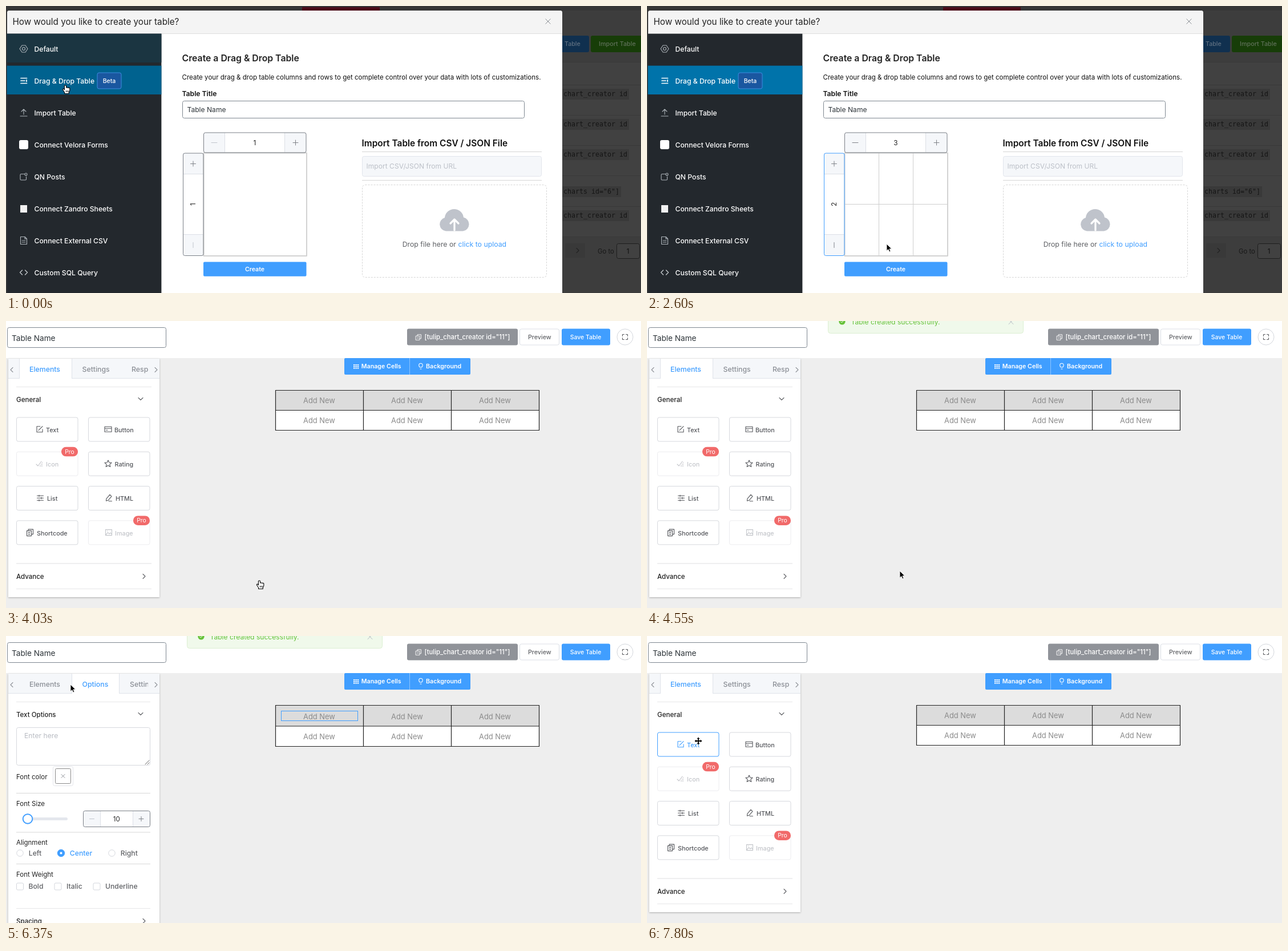
Animation of 1113 by 503 pixels, one loop 8000 ms. Source, as an HTML page:

```html
<!DOCTYPE html>
<html lang="en">
<head>
<meta charset="utf-8">
<title>Table builder</title>
<style>
  html, body { margin: 0; width: 100%; height: 100%; overflow: hidden; background: #eee; }
  svg { display: block; width: 100vw; height: 100vh; font-family: Inter, "Open Sans", sans-serif; }
  text { white-space: pre; }
  .m { font-weight: 500; }
  .b { font-weight: 600; }
  .mid { text-anchor: middle; }
  .code { font-family: "DejaVu Sans Mono", monospace; }
  .line { fill: none; stroke: currentColor; stroke-linecap: round; stroke-linejoin: round; }
  .frame { fill: none; stroke: #7b8087; }
  .colHot #colFrame, .rowHot #rowFrame { stroke: #409eff; }
  .colHot #colPlus, .rowPlus #rowPlus { color: #48aaa8; }
  .active { fill: #0073aa; }
  .leaving .active { fill: #00628f; }
  .createHot #create { fill: #66b1ff; }
  .tabHot #tabElements { fill: #409eff; }
  .cardHot #card0 { color: #409eff; }
  .cardHot #card0 rect { stroke: #409eff; }
</style>
</head>
<body>
<svg id="stage" viewBox="0 0 1113 503" preserveAspectRatio="none"></svg>
<script>
const LOOP = 8000, BLUE = '#409eff', GREY = '#606266', SIGN = '#7f8288', FAINT = '#c0c4cc', MUTED = '#aeb4ba';
const stage = document.getElementById('stage');

const text = (x, y, s, size, fill = '#222', cls = '', more = '') =>
  `<text x="${x}" y="${y}" font-size="${size}" fill="${fill}" class="${cls}" ${more}>${s}</text>`;
const rect = (x, y, w, h, fill, more = '') =>
  `<rect x="${x}" y="${y}" width="${w}" height="${h}" fill="${fill}" ${more}/>`;
const box = (x, y, w, h, fill, stroke, r = 3, more = '') =>
  rect(x + .5, y + .5, w - 1, h - 1, fill, `stroke="${stroke}" rx="${r}" ${more}`);
const line = (d, color, width = 1, more = '') =>
  `<path class="line" d="${d}" color="${color}" stroke-width="${width}" ${more}/>`;
const rule = (x1, x2, y, color) => rect(x1, y, x2 - x1, 1, color);
const icon = (x, y, d, color = 'inherit', width = 1.1) =>
  `<g transform="translate(${x} ${y})">${line(d, color, width)}</g>`;
const group = (body, more = '') => `<g ${more}>${body}</g>`;
const plus = (x, y, r, color, more = '') =>
  line(`M${x - r} ${y}h${2 * r}M${x} ${y - r}v${2 * r}`, color, 1, more);
const cross = (x, y, r, color) =>
  line(`M${x - r} ${y - r}l${2 * r} ${2 * r}m0 ${-2 * r}l${-2 * r} ${2 * r}`, color);
const chevron = { down: 'M-4-2L0 2L4-2', right: 'M-2-4L2 0L-2 4', left: 'M2-4L-2 0L2 4' };

function backdrop() {
  const codeRows = [[154, 'chart_creator id'], [207, 'chart_creator id'], [260, 'chart_creator id'],
    [325, 'charts id="6"]'], [367, 'chart_creator id']];
  return rect(0, 0, 1113, 503, '#3d3d3d') + rect(0, 0, 1113, 8, '#373737') +
    rect(519, 2, 136, 6, '#4a0a17') + rect(975, 98, 138, 306, '#414141') +
    [98, 138, 191, 244, 297, 351, 404].map(y => rule(975, 1113, y, '#393939')).join('') +
    rect(960, 52, 62, 29, '#10304f', 'rx="3"') + text(979, 70, 'Table', 10.7, '#5f7081', 'm') +
    rect(1025, 52, 92, 29, '#173d08', 'rx="3"') + text(1039, 70, 'Import Table', 10.8, '#5f7059', 'm') +
    codeRows.map(([y, s]) => rect(970, y - 9, s.length * 7 + 10, 19, '#393939') +
      text(977, y + 4, s, 11.63, '#151515', 'code')).join('') +
    rect(980, 416, 35, 25, '#393939') + icon(1002, 428.5, chevron.right, '#222') +
    text(1037, 434, 'Go to', 11.3, '#181818') + box(1070, 416, 41, 27, '#414141', '#1e1e1e') +
    text(1090, 434, '1', 11.5, '#0e0e0e', 'mid');
}

function sidebar() {
  const labels = ['Default', 'Drag &amp; Drop Table', 'Import Table', 'Connect Velora Forms',
    'QN Posts', 'Connect Zandro Sheets', 'Connect External CSV', 'Custom SQL Query'];
  const hexagon = 'M-3-6H3L7 0L3 6H-3L-7 0ZM2.5 0A2.5 2.5 0 1 1-2.5 0A2.5 2.5 0 1 1 2.5 0';
  const icons = [
    icon(31, 75, hexagon, MUTED),
    icon(31, 131, 'M-5-4.5H5.5M-5 0H2M-5 4.5H5.5M5-1.5v3', '#fff', 1.7),
    icon(31, 187, 'M0 3V-5.5M-4-2L0-6L4-2M-6 6H6', MUTED),
    rect(23, 235, 16, 16, '#fff', 'rx="3"'),
    icon(31, 299, 'M1-4.5H-4.5Q-6-4.5-6-3V4.5Q-6 6-4.5 6H3Q4.5 6 4.5 4.5V0M6-4A2 2 0 1 1 2-4A2 2 0 1 1 6-4', MUTED),
    rect(25, 349, 12, 13, '#f2f2f2'),
    icon(31, 411, 'M-5.5-6.5H2L5.5-3V6.5H-5.5ZM2-6V-3H5M-3 0H3M-3 3H3', MUTED),
    icon(31, 467, 'M-2.5-4L-6.5 0L-2.5 4M2.5-4L6.5 0L2.5 4', '#c3c8cc', 1.4)
  ];
  return rect(1.6, 48.6, 270.8, 455, '#23282d') +
    rect(1.6, 48.6, 270.8, 50.4, '#1b3541', 'data-on="leaving"') +
    rect(1.6, 104.6, 270.8, 50.4, '#0073aa', 'class="active"') +
    labels.map((s, i) => text(49.5, 79.5 + 56 * i, s, 12.2, '#fff', 'm')).join('') + icons.join('') +
    box(159.5, 116.5, 43, 29, '#1a57a0', '#3f8ce0') + text(181, 135.3, 'Beta', 10.5, '#fff', 'm mid');
}

function counters() {
  return rect(347, 222, 179, 35, '#fff') + rect(347, 222, 36, 35, '#f5f7fa') + rect(489, 222, 37, 35, '#f5f7fa') +
    rect(383, 222, 1, 35, '#dcdfe6') + rect(488, 222, 1, 35, '#dcdfe6') +
    line('M360 239.5h10', FAINT, 1, 'id="colMinus"') + plus(507.5, 239.5, 4.5, SIGN, 'id="colPlus"') +
    text(436, 244, '1', 11.8, '#222', 'mid', 'id="colCount"') +
    rect(310, 258, 36, 36, '#f5f7fa') + rect(310, 401, 36, 36, '#f5f7fa') +
    rule(310, 346, 294, '#dcdfe6') + rule(310, 346, 400, '#dcdfe6') +
    line('M328 414.5v9', FAINT, 1, 'id="rowMinus"') + plus(328, 276.5, 4.5, SIGN, 'id="rowPlus"') +
    text(0, 4.3, '1', 11.8, '#222', 'mid', 'id="rowCount" transform="translate(328 347.5) rotate(-90)"') +
    line('M346.5 257.5H527V438H346.5Z', '#d2d2d2', 2) + line('', '#cfcfcf', 1, 'id="grid"') +
    rect(346.5, 222, 179.5, 35, 'none', 'id="colFrame" class="frame" rx="3"') +
    rect(310.5, 258, 35.5, 179.5, 'none', 'id="rowFrame" class="frame" rx="3"');
}

function modal() {
  const cloud = 'M771 394.5A12 12 0 0 1 769 371A16.6 16.6 0 0 1 802 370.5A12.2 12.2 0 0 1 801 394.5Z';
  return backdrop() + rect(2, 8, 973, 500, '#fff', 'rx="4"') +
    '<path d="M2 49V12Q2 8 6 8H971Q975 8 975 12V49Z" fill="#f4f4f4"/>' + rule(2, 975, 48, '#dedede') +
    text(11.5, 33.3, 'How would you like to create your table?', 15.25, '#222') + cross(950, 27, 4.2, '#8b8f95') +
    sidebar() +
    text(308.5, 96.7, 'Create a Drag &amp; Drop Table', 15.8, '#222', 'b') +
    text(308.5, 129, 'Create your drag &amp; drop table columns and rows to get complete control over your data with lots of customizations.', 11.57, '#111') +
    text(308.5, 157.7, 'Table Title', 12.15, '#111', 'b') +
    box(309, 166, 600, 31, '#fff', '#7e8790') + text(317.5, 186, 'Table Name', 12.1, '#2c3338') +
    counters() +
    rect(346, 448.5, 180.5, 25.2, BLUE, 'rx="2" id="create"') + text(436, 465.3, 'Create', 10.6, '#fff', 'b mid') +
    text(623.5, 245.5, 'Import Table from CSV / JSON File', 15.45, '#111', 'b') +
    rule(624, 939, 255, '#d5d5d5') + box(624, 263, 315, 36, '#f5f7fa', '#e2e5ec') +
    text(631.5, 285.3, 'Import CSV/JSON from URL', 12.1, '#bcc0c8') + rule(624, 939, 305, '#d5d5d5') +
    box(624, 313, 324, 163, '#fff', '#d6d6d6', 5, 'stroke-dasharray="3 2"') +
    `<path d="${cloud}" fill="#bfc3cb"/>` + line('M786 393V375M779 381L786 374L793 381', '#fff', 3.2) +
    text(694.7, 422.3, `Drop file here or <tspan fill="${BLUE}">click to upload</tspan>`, 12.3, GREY);
}

function tabs(names, active) {
  const narrow = names[1] === 'Options';
  const edges = [23, 115, narrow ? 198 : 201, 258];
  const labelX = [41, 133.5, narrow ? 217 : 220];
  return rect(4, 66, 265, 35, '#f5f7fa') + rule(4, 269, 100, '#dfe3ea') +
    rect(edges[active], 66, edges[active + 1] - edges[active], 35, '#fff') +
    [edges[active], edges[active + 1]].map(x => rect(x, 66, 1, 35, '#dfe3ea')).join('') +
    names.map((s, i) => text(labelX[i], 88.5, s, 12.3, i === active ? BLUE : '#8b8f96', 'm',
      `clip-path="url(#tabClip)" ${i === 0 && active ? 'id="tabElements"' : ''}`)).join('') +
    icon(10, 85.5, chevron.left, '#909399') + icon(263, 85.5, chevron.right, '#909399');
}

function elementsPanel() {
  const cards = [
    ['Text', 70, 59, 'M1-5H-5V5H5V0M-1.5 1.5L5-5M-1.5 1.5L-2 2'],
    ['Button', 190, 179, 'M-6-4.5H6V4.5H-6ZM-6-1.5H6M-3.5 1.5H-1'],
    ['Icon', 70, 59, 'M-6 1L-3 4L3-4M0 4H5M2 1H5M4-2H5'],
    ['Rating', 190.5, 179, 'M0-6L1.8-2L6-1.6L2.8 1.3L3.8 5.5L0 3.2L-3.8 5.5L-2.8 1.3L-6-1.6L-1.8-2Z'],
    ['List', 72, 60, 'M-5.5-4H5.5M-5.5 0H5.5M-5.5 4H5.5M-2-5.3v2.6M2-1.3v2.6M-2 2.7v2.6'],
    ['HTML', 192, 180, 'M-4.5 5L-4 1L2-6L5-3L-1 4ZM0 5.5H5.5'],
    ['Shortcode', 54, 42, 'M-5.5-3H2.5V6H-5.5ZM-3-3V-5.5H5.5V3H2.5M-3 0H0M-3 3H0'],
    ['Image', 191, 180, 'M-5.5-5H5.5V5H-5.5ZM-5 4L-1.5 0L1 2.5L3 .5L5.5 3M-2.5-2.5h.4']
  ];
  const card = ([label, x, iconX, d], i) => {
    const left = i % 2 ? 144 : 18, top = 168.5 + 60.3 * (i >> 1), pro = i === 2 || i === 7;
    return group(box(left, top, 108.5, 43, '#fff', pro ? '#ececef' : '#d6d8dd') +
      icon(iconX, top + 21.2, d) + text(x, top + 26.2, label, 10.8, 'currentColor', 'm') +
      (pro ? rect(left + 79, top - 8, 29, 16.5, '#f16a6a', 'rx="8"') +
        text(left + 93.5, top + 4, 'Pro', 10.4, '#fff', 'mid') : ''),
      `id="card${i}" color="${pro ? '#c3c5ca' : '#55575c'}"`);
  };
  return rect(4, 66, 265, 418, '#fff', 'filter="url(#shadow)"') + tabs(['Elements', 'Settings', 'Resp'], 0) +
    rule(18, 255, 115, '#e6e6e8') + text(18, 141.7, 'General', 11.6, '#222', 'm') + icon(236, 136.5, chevron.down, GREY) +
    cards.map(card).join('') + rule(18, 255, 424.5, '#dfdfe2') +
    text(18, 452, 'Advance', 11.5, '#222', 'm') + icon(242, 447.5, chevron.right, GREY) + rule(18, 255, 469, '#e6e6e8');
}

function optionsPanel() {
  const radio = (x, label, on) =>
    `<circle cx="${x}" cy="380.5" r="${on ? 6.2 : 5.7}" fill="${on ? BLUE : '#fff'}" stroke="${on ? BLUE : '#d4d7dd'}"/>` +
    (on ? `<circle cx="${x}" cy="380.5" r="2" fill="#fff"/>` : '') +
    text(x + 15.3, 385, label, 12.2, on ? BLUE : GREY, 'm');
  const check = (x, label) => box(x, 432.5, 13, 13, '#fff', '#d4d7dd', 2) + text(x + 21.5, 443.3, label, 12.2, GREY, 'm');
  return rect(4, 66, 265, 445, '#fff', 'filter="url(#shadow)"') + tabs(['Elements', 'Options', 'Settings'], 1) +
    rule(18, 253, 115, '#e6e6e8') + text(18, 141.7, 'Text Options', 11.5, '#222', 'm') + icon(236, 136.5, chevron.down, GREY) +
    box(18, 160, 235, 67, '#fff', '#d6d8dd') + text(32, 179, 'Enter here', 12.2, '#b9bcc3') +
    line('M244 225L251 218M248 225L251 222', '#666') +
    text(18, 251.3, 'Font color', 11.5) + box(82, 228, 36, 35, '#fff', '#e3e5ea') +
    box(86, 232, 28, 27, '#fff', '#8a8a8a', 2) + cross(100, 245.5, 3, '#909399') +
    rule(18, 253, 275, '#d8d8d8') + text(18, 297.5, 'Font Size', 11.5) +
    rect(38, 318, 70, 5, '#e4e7ed', 'rx="2.5"') + `<circle cx="38" cy="320.5" r="8.3" fill="#fff" stroke="${BLUE}" stroke-width="2"/>` +
    box(135, 306, 118, 29, '#f5f7fa', '#7b8087') + rect(165, 307, 58, 27, '#fff') +
    rect(165, 307, 1, 27, '#dcdfe6') + rect(222, 307, 1, 27, '#dcdfe6') +
    line('M146.5 320.5h8', FAINT) + plus(237, 320.5, 4, SIGN) + text(193.7, 325, '10', 11.5, '#222', 'mid') +
    rule(18, 253, 343.5, '#d8d8d8') + text(18, 366, 'Alignment', 11.5) +
    radio(24.5, 'Left') + radio(96.5, 'Center', true) + radio(185.5, 'Right') +
    rule(18, 253, 399, '#d8d8d8') + text(18, 421.7, 'Font Weight', 11.5) +
    check(18, 'Bold') + check(84.5, 'Italic') + check(152.5, 'Underline') +
    rule(18, 253, 477, '#e6e6e8') + text(18, 504, 'Spacing', 11.5, '#222', 'm') + icon(242, 499.5, chevron.right, GREY);
}

function table(selected) {
  const split = selected ? 158 : 156.5, bottom = selected ? 193.5 : 191.5;
  const labels = [split - 12.5, bottom - 12.8].map(y =>
    [549, 703, 857].map(x => text(x, y, 'Add New', 12.9, '#8b8b8b', 'mid')).join('')).join('');
  return rect(472, 121.5, 463, split - 121.5, '#dcdcdc') + rect(472, split, 463, bottom - split, '#fff') +
    line(`M472.5 121.5H934.5V${bottom}H472.5ZM472.5 ${split}H934.5M626.5 121.5V${bottom}M780.5 121.5V${bottom}`, '#222', 1.2) +
    labels + (selected ? rect(482.5, 131.5, 134, 17, 'none', `stroke="${BLUE}"`) : '');
}

function editor() {
  const gridDots = [0, 1, 2].map(i => [0, 1, 2].map(j => rect(609 + 3.4 * i, 76 + 2.9 * j, 2.4, 1.9, '#fff')).join('')).join('');
  return rect(0, 0, 1113, 503, '#eee') + rect(0, 0, 1113, 65, '#fff') +
    box(2, 11, 279, 36, '#fff', '#7e8790') + text(10, 34.5, 'Table Name', 13.6, '#2c3338') +
    rect(703, 13.5, 194, 29, '#909399', 'rx="3"') +
    icon(723, 28.3, 'M-4.5-2H2V5H-4.5ZM-2-2V-4.5H4.5V2.5H2M-2.5 1.5H0', '#fff', .9) +
    text(733.5, 32.2, '[tulip_chart_creator id="11"]', 11.3, '#fff', 'm') +
    box(900, 13.5, 70, 29, '#fff', '#dcdfe6') + text(935.3, 32, 'Preview', 10.7, GREY, 'm mid') +
    rect(974, 13.5, 85, 29, BLUE, 'rx="3"') + text(1016, 32, 'Save Table', 10.5, '#fff', 'm mid') +
    '<circle cx="1085" cy="28" r="14" fill="#fff" stroke="#d3d6dc"/>' +
    icon(1085, 28, 'M-4.5-1.5V-4.5H-1.5M1.5-4.5H4.5V-1.5M4.5 1.5V4.5H1.5M-1.5 4.5H-4.5V1.5', GREY) +
    rect(593, 65, 221, 29, BLUE, 'rx="2"') + rect(707, 65, 1, 29, '#8dc4ff') + gridDots +
    text(622.7, 83.4, 'Manage Cells', 10.7, '#fff', 'b') +
    icon(727, 79, 'M-1.5 2Q-3.3.5-3.3-1.5A3.3 3.3 0 0 1 3.3-1.5Q3.3.5 1.5 2ZM-1 5H1', '#fff') +
    text(736, 83.4, 'Background', 10.7, '#fff', 'b') +
    group(table(false), 'data-off="options"') + group(table(true), 'data-on="options"') +
    group(elementsPanel(), 'data-off="options"') + group(optionsPanel(), 'data-on="options"') +
    group(box(317, -20, 343, 42, '#f0f9eb', '#dcefd2', 4) + '<circle cx="342" cy="1" r="5.6" fill="#67c23a"/>' +
      line('M339.5 1L341.3 2.8L344.6-.6', '#fff') + text(357.5, 5.7, 'Table created successfully.', 12.1, '#67c23a') +
      cross(638, 1.5, 4, '#b5bac2'), 'data-on="notice"');
}

const cursors = {
  arrow: '<path d="M0 0V12.3L2.9 9.6L4.8 14L6.9 13.1L5 8.8H9Z" fill="#000" stroke="#fff" stroke-width=".9"/>',
  hand: '<path d="M0 0C-1 0-1.6.7-1.6 1.6V7.6L-3 6.3C-4 5.6-5.2 6.6-4.5 7.7L-1.4 12.3V14.5H6.2V12.4L7.8 9V5.3C7.8 4 6 3.8 5.7 5C5.6 3.7 3.8 3.6 3.6 4.7C3.4 3.5 1.7 3.4 1.6 4.4V1.6C1.6.7 1 0 0 0Z" fill="#fff" stroke="#000" stroke-width="1.1"/><path d="M1.3 9V12M3.2 9V12M5.1 9V12" stroke="#000" stroke-width=".8"/>',
  move: '<path d="M0-6.5L2.6-3.6H.9V-.9H3.6V-2.6L6.5 0L3.6 2.6V.9H.9V3.6H2.6L0 6.5L-2.6 3.6H-.9V.9H-3.6V2.6L-6.5 0L-3.6-2.6V-.9H-.9V-3.6H-2.6Z" fill="#000" stroke="#fff" stroke-width=".8" paint-order="stroke"/>'
};

stage.innerHTML = `<defs>
  <filter id="shadow" x="-5%" y="-5%" width="110%" height="110%"><feDropShadow dx="0" dy="1" stdDeviation="1.6" flood-color="#000" flood-opacity=".28"/></filter>
  <clipPath id="tabClip"><rect x="23" y="66" width="226" height="35"/></clipPath></defs>` +
  group(modal(), 'data-off="editor"') + group(editor(), 'data-on="editor"') + '<g id="cursor"></g>';

// start time, cursor, x, y, columns, rows, state flags
const steps = [
  [0, 'hand', 104, 139, 1, 1, 'leaving'],
  [130, 'arrow', 200, 165, 1, 1, ''],
  [390, 'arrow', 385, 232, 1, 1, ''],
  [520, 'arrow', 530, 268, 1, 1, ''],
  [780, 'hand', 517, 246, 1, 1, 'colHot'],
  [1170, 'hand', 517, 246, 2, 1, 'colHot'],
  [1430, 'hand', 517, 246, 3, 1, 'colHot'],
  [1820, 'arrow', 430, 264, 3, 1, ''],
  [1950, 'hand', 332, 275, 3, 1, 'rowHot rowPlus'],
  [2210, 'hand', 332, 275, 3, 2, 'rowHot rowPlus'],
  [2600, 'arrow', 420, 417, 3, 2, 'rowHot'],
  [2860, 'hand', 442, 453, 3, 2, 'createHot'],
  [3250, 'hand', 444, 455, 3, 2, 'createHot'],
  [4030, 'hand', 444, 455, 3, 2, 'editor'],
  [4290, 'hand', 444, 455, 3, 2, 'editor notice'],
  [4550, 'arrow', 443, 438, 3, 2, 'editor notice'],
  [4680, 'arrow', 485, 287, 3, 2, 'editor notice'],
  [4940, 'arrow', 488, 230, 3, 2, 'editor notice'],
  [5070, 'arrow', 491, 182, 3, 2, 'editor notice'],
  [5330, 'hand', 530, 142, 3, 2, 'editor notice'],
  [5590, 'hand', 548, 139, 3, 2, 'editor notice'],
  [5980, 'hand', 548, 139, 3, 2, 'editor notice options'],
  [6110, 'arrow', 290, 122, 3, 2, 'editor notice options'],
  [6370, 'arrow', 113, 85, 3, 2, 'editor notice options'],
  [6630, 'hand', 80, 82, 3, 2, 'editor notice options tabHot'],
  [7020, 'hand', 80, 82, 3, 2, 'editor'],
  [7410, 'hand', 88, 84, 3, 2, 'editor'],
  [7670, 'arrow', 92, 130, 3, 2, 'editor'],
  [7800, 'move', 90, 184, 3, 2, 'editor cardHot']
];

const $ = id => document.getElementById(id);
const toggles = stage.querySelectorAll('[data-on], [data-off]');
let shown;

function show([, kind, x, y, cols, rows, state]) {
  const flags = state.split(' ');
  stage.setAttribute('class', state);
  for (const el of toggles) {
    const { on, off } = el.dataset;
    el.style.display = (on ? flags.includes(on) : !flags.includes(off)) ? '' : 'none';
  }
  $('colCount').textContent = cols;
  $('rowCount').textContent = rows;
  $('colMinus').setAttribute('color', cols > 1 ? SIGN : FAINT);
  $('rowMinus').setAttribute('color', rows > 1 ? SIGN : FAINT);
  let d = '';
  for (let c = 1; c < cols; c++) d += `M${346.5 + 180 * c / cols} 258V437`;
  for (let r = 1; r < rows; r++) d += `M347 ${257.5 + 180 * r / rows}H526`;
  $('grid').setAttribute('d', d);
  $('cursor').innerHTML = cursors[kind];
  $('cursor').setAttribute('transform', `translate(${x} ${y})`);
}

function tick() {
  const time = performance.now() % LOOP;
  const step = steps.findLast(s => s[0] <= time);
  if (step !== shown) show(shown = step);
  requestAnimationFrame(tick);
}
tick();
</script>
</body>
</html>
```
